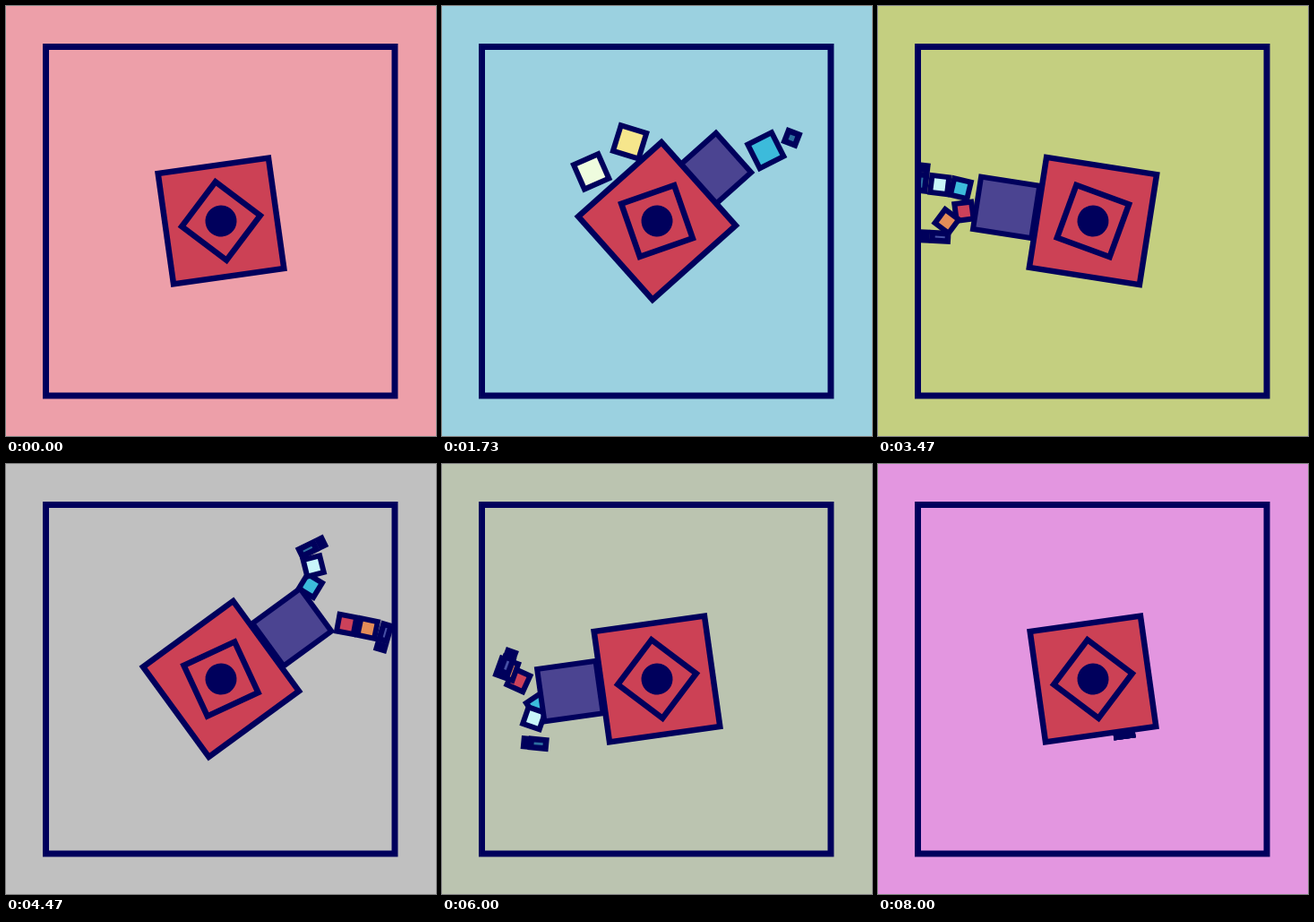
Recreate the animation shown at these times as an HTML page with a canvas. Size 480 by 480 pixels, loop 8070 ms.

```html
<!DOCTYPE html>
<html lang="en">
<head>
<meta charset="utf-8">
<title>Tumbling walker</title>
<style>
html, body { margin: 0; width: 100%; height: 100%; overflow: hidden; }
canvas { display: block; width: 100vw; height: 100vh; }
</style>
</head>
<body>
<canvas id="stage" width="480" height="480"></canvas>
<script>
const ctx = document.getElementById('stage').getContext('2d');
const LOOP = 8070, STEP = 200 / 3;      // ms per loop and per picture
const POSES = 192, STRIDE = POSES / 5;  // poses per loop and per pair of steps
const NAVY = '#00005c', RED = '#cc4155', TAU = 2 * Math.PI;

const rad = d => d * Math.PI / 180;
const mix = (a, b, u) => a.map((v, i) => v + (b[i] - v) * u);
const rgb = c => `rgb(${c.map(Math.round)})`;
const ramp = (f, a, b) => Math.min(1, Math.max(0, (f - a) / (b - a)));
const smooth = u => u * u * (3 - 2 * u);
// eases up over a..b, stays, eases down over c..d
const hold = (f, a, b, c, d) => smooth(ramp(f, a, b)) - smooth(ramp(f, c, d));

const SKY = [
  [0, [237, 159, 169]], [42, [155, 209, 224]], [83, [196, 207, 128]], [107, [192, 192, 192]],
  [128, [142, 224, 185]], [160, [232, 167, 167]], [POSES, [227, 150, 224]]
];
function sky(f) {
  const i = Math.max(1, SKY.findIndex(([time]) => time >= f));
  const [t0, a] = SKY[i - 1], [t1, b] = SKY[i];
  return rgb(mix(a, b, ramp(f, t0, t1)));
}

// Blocks leave the head at START, drift by `from`, join a leg,
// drift off by `to` and come back at END. Places are [x, y, tilt].
const START = [0, 20, 0], END = [26, 59, 0];
const block = (leg, joint, color, from = START, to = END, early = color) =>
  ({ leg, joint, color, from, to, early });
const BLOCKS = [
  block(0, 0, [60, 187, 219], [-22, 143, 15], [-45, 105, -29]),
  block(0, 1, [200, 245, 250], [90, -18, 18], [-45, 78, -19], [238, 252, 222]),
  block(0, 2, [45, 110, 160], [-31, 174, -27]),
  block(1, 0, [204, 65, 90], START, [18, 164, 30]),
  block(1, 1, [228, 140, 88], [86, 36, -31], [1, 134, 4], [246, 230, 140]),
  block(1, 2, [70, 80, 165])
];

function box(x, y, w, h, angle, fill, line) {
  ctx.save();
  ctx.translate(x, y);
  ctx.rotate(rad(angle));
  ctx.fillStyle = NAVY;
  ctx.fillRect(-w / 2, -h / 2, w, h);
  ctx.fillStyle = fill;
  ctx.fillRect(line - w / 2, line - h / 2, w - 2 * line, h - 2 * line);
  ctx.restore();
}

// Place of one joint in the walk; the two legs are half a stride apart.
function gait(leg, joint, f) {
  const p = TAU * ((f - 107) / STRIDE + (leg ? 0 : 0.5));
  const swing = (mean, size, lag, kick) =>
    rad(mean - size * Math.cos(p - rad(lag)) - kick * Math.sin(2 * p));
  const angles = [swing(-12, 40, 30, 18), swing(10, 60, 15, 22), swing(14, 66, 0, 35)];
  let x = -2 - 24 * Math.cos(p - rad(20)), y = 136 + 5 * Math.cos(p);
  for (let i = 0; ; i++) {
    const half = i < 2 ? 12 : 8;
    const dx = half * Math.sin(angles[i]), dy = half * Math.cos(angles[i]);
    if (i === joint) return [x + dx, y + dy, -angles[i] * 360 / TAU];
    x += 2 * dx;
    y += 2 * dy;
  }
}

function drawBlock({ leg, joint, color, from, to, early }, f) {
  const out = hold(f, 4, 42, 160, 188), joined = hold(f, 42, 62, 138, 160);
  const rising = f < POSES / 2;
  const loose = rising ? mix(START, from, out) : mix(END, to, out);
  const [x, y, tilt] = mix(loose, gait(leg, joint, f), joined);
  if (joint < 2) {
    const looseSize = 39 - 0.076 * f, size = looseSize + (25 - looseSize) * joined;
    box(x, y, size, size, tilt, rgb(rising ? mix(early, color, joined) : color), 6);
    return;
  }
  // ankle with a toe that points forward
  box(x, y, 19 + 5 * joined, 19 - 4 * joined, tilt, rgb(color), 6.5);
  const a = rad(tilt), toe = 17 * joined;
  if (toe) box(x - toe * Math.cos(a), y - toe * Math.sin(a), 11, 15, tilt, NAVY, 3);
}

function draw(f) {
  const spin = f * 3 * 360 / POSES;
  ctx.fillStyle = sky(f);
  ctx.fillRect(0, 0, 480, 480);

  ctx.save();
  ctx.beginPath();
  ctx.rect(44, 45, 391, 391);
  ctx.clip();
  ctx.translate(240, 240);
  ctx.rotate(rad(spin - 8));
  BLOCKS.forEach(b => drawBlock(b, f));
  const reach = 58 + 76 * hold(f, 14, 54, 152, 186);
  box(0, reach - 36, 65, 72, 0, '#4b4491', 6);
  box(0, 0, 131, 131, 0, RED, 6.5);
  box(0, 0, 69, 69, 45 - 2 * spin, RED, 6.5);
  ctx.fillStyle = NAVY;
  ctx.beginPath();
  ctx.arc(0, 0, 17.5, 0, TAU);
  ctx.fill();
  ctx.restore();

  ctx.strokeStyle = NAVY;
  ctx.lineWidth = 7;
  ctx.strokeRect(44.5, 45.5, 389.5, 389.5);
}

const start = performance.now();
function tick() {
  const t = (performance.now() - start) % LOOP;
  // 15 pictures a second, each showing the nearest of 24 poses a second
  const shown = Math.min(120, Math.floor((t + 3.4) / STEP));
  draw(Math.round(shown * 1.6));
  requestAnimationFrame(tick);
}
tick();
</script>
</body>
</html>
```
